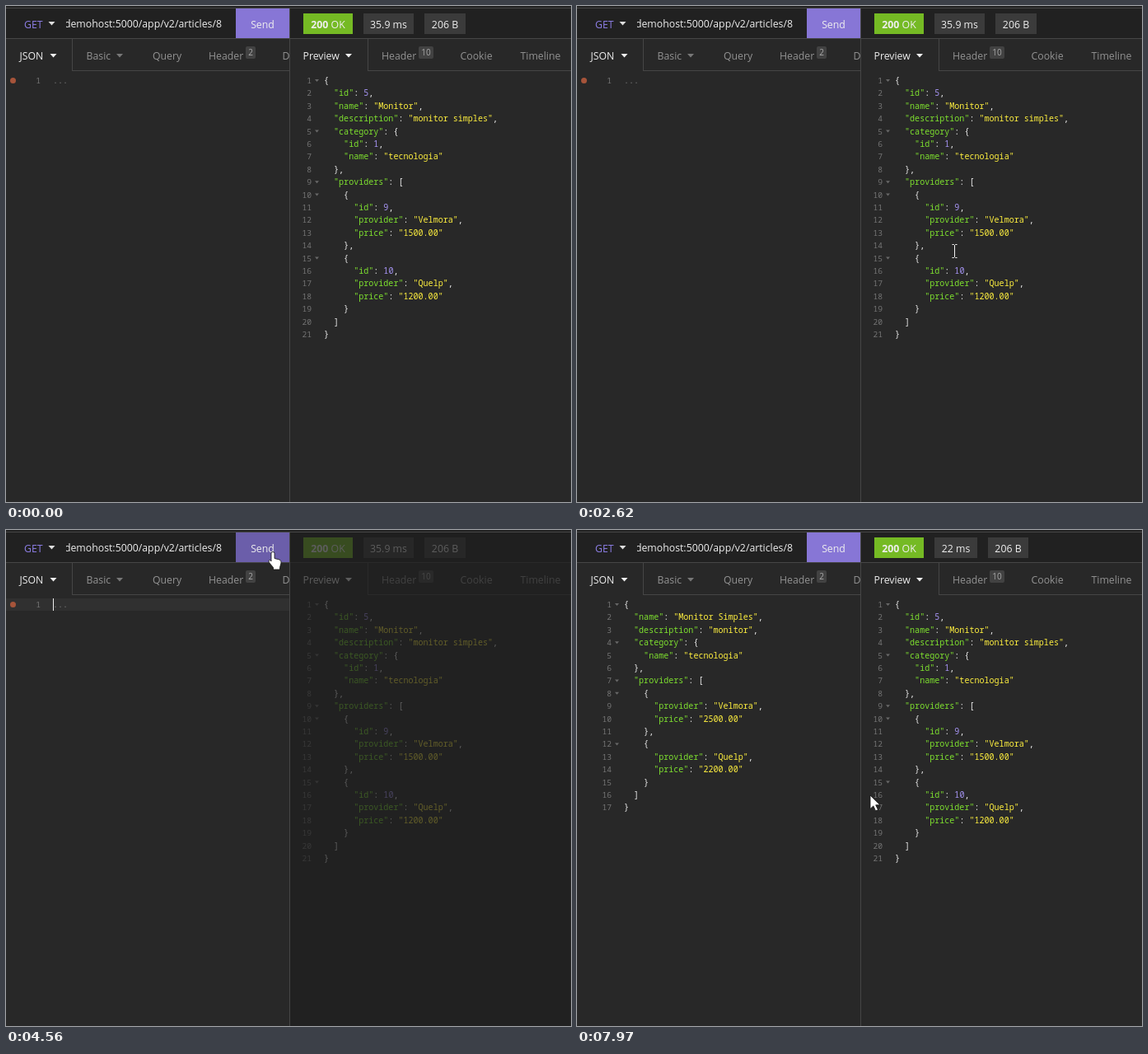
These frames come from a looping animation (686 px wide and 602 px high, 8 s). An HTML page:

```html
<!DOCTYPE html>
<html lang="en">
<head>
<meta charset="utf-8">
<title>API client</title>
<style>
html, body { margin: 0; width: 100%; height: 100%; overflow: hidden; background: #282828; }
svg { display: block; width: 686px; height: 602px; }
text { white-space: pre; fill: #eee; font: 12.3px "Open Sans", "Noto Sans", sans-serif; }
.code text { font: 500 10.05px "Noto Sans Mono", "DejaVu Sans Mono", monospace; }
.code text.num { fill: #747474; font-size: 9.7px; font-weight: 400; }
.key { fill: #7ee02f; }
.str { fill: #fff03f; }
.val { fill: #a795f5; }
.mid { text-anchor: middle; }
.end { text-anchor: end; }
text.dim { fill: #929292; }
text.small { font-size: 10px; fill: #aaa; }
</style>
</head>
<body>
<svg viewBox="0 0 686 602">
  <clipPath id="urlBox"><path d="M73 3h200v36H73z"/></clipPath>
  <clipPath id="leftPane"><path d="M0 0h344v602H0z"/></clipPath>
  <g id="ui"></g>
  <g id="idle" class="code">
    <rect id="active" y="83" width="344" height="15" fill="#303030"/>
    <circle cx="8.5" cy="90.5" r="3.5" fill="#a6543a"/>
    <text class="num end" x="42" y="94">1</text>
    <text x="57" y="94" style="fill:#777">...</text>
    <path id="caret" d="M57.5 83v15" stroke="#eee"/>
  </g>
  <g id="request" class="code"></g>
  <g id="response" class="code"></g>
  <g id="oldStats"></g>
  <g id="newStats"></g>
  <rect id="shade" x="345" y="3" width="341" height="599" fill="#1e1e1e"/>
  <g id="cursor">
    <path id="beam" d="M-3 -8h2l1 1 1 -1h2M0 -7v14M-3 8h2l1 -1 1 1h2" fill="none" stroke="#f4f4f4"/>
    <path id="arrow" d="M0 0v16.5l3.8 -3.6 2.8 6 2.9 -1.3 -2.8 -5.8h5.3z" fill="#fff" stroke="#111" stroke-width=".8"/>
    <path id="hand" d="M-2 1.5q0 -2 2 -2t2 2v6l6 1.5q2.6 1 2 4l-1.5 5.5v2.5h-8v-2.5l-5 -6q-1.5 -3 1 -3l1.5 1.5z" fill="#fff" stroke="#111" stroke-width=".8"/>
  </g>
</svg>
<script>
const LOOP = 8000, STEP = 69.4, ROW = 15.4, CHAR = 6.03, LINE = '#464646';
const $ = id => document.getElementById(id);
const show = (id, on) => $(id).setAttribute('visibility', on ? 'visible' : 'hidden');

const rect = (x, y, w, h, fill, extra = '') =>
  `<rect x="${x}" y="${y}" width="${w}" height="${h}" fill="${fill}" ${extra}/>`;
const label = (x, y, str, cls = '', extra = '') =>
  `<text x="${x}" y="${y}" class="${cls}" ${extra}>${str}</text>`;
const chevron = (x, y, fill, w = 8, h = 4.5) =>
  `<path d="M${x} ${y}h${w}l${-w / 2} ${h}z" fill="${fill}"/>`;
const badge = (x, w, str, fill = '#3b3b3b') =>
  rect(x, 9, w, 25, fill) + label(x + w / 2, 26.5, str, 'mid');
const tab = (x, str) => label(x, 65, str, 'dim');
const count = (x, w, str) =>
  rect(x, 49, w, 15, '#424242', 'rx="2"') + label(x + w / 2, 60, str, 'small mid');
const tabEdge = (x, end) => rect(x, 40, 1, 39, LINE) + rect(x, 78, end - x, 1, LINE);

$('ui').innerHTML =
  rect(0, 0, 686, 39, '#212121') + rect(0, 2, 686, 1, LINE) + rect(0, 39, 686, 1, LINE) +
  rect(279, 3, 65, 36, '#8776d6', 'id="send"') + rect(344, 3, 1, 599, LINE) +
  tabEdge(80, 344) + tabEdge(439, 686) +
  label(22, 26.5, 'GET', '', 'style="fill:#8d7ee6"') + chevron(51.5, 19, '#ddd') +
  `<g clip-path="url(#urlBox)">${label(262, 26, 'demohost:5000/app/v2/articles/8', 'end')}</g>` +
  label(311.5, 26.5, 'Send', 'mid') +
  label(16.5, 65, 'JSON') + chevron(53.5, 58, '#eee') +
  tab(97.5, 'Basic') + chevron(134, 58, '#777') +
  tab(178, 'Query') + tab(246, 'Header') + count(291, 12, 2) +
  `<g clip-path="url(#leftPane)">${tab(335.5, 'Docs')}</g>` +
  label(360.5, 65, 'Preview') + chevron(412, 58, '#eee') +
  tab(456, 'Header') + count(501, 18, 10) + tab(551.5, 'Cookie') + tab(624.5, 'Timeline') +
  badge(361, 60, '<tspan font-weight="700">200</tspan> OK', '#75ba24');
$('oldStats').innerHTML = badge(434, 61, '35.9 ms') + badge(508, 50, '206 B');
$('newStats').innerHTML = badge(434, 52, '22 ms') + badge(499, 49, '206 B');

// Pretty-printed JSON with line numbers and fold marks
function editor(id, data, x) {
  const paint = s => s.replace(/("[^"]*")(:?)|\d+/g, (all, word, colon) => {
    const cls = !word ? 'val' : colon ? 'key' : 'str';
    return `<tspan class="${cls}">${word || all}</tspan>${colon || ''}`;
  });
  $(id).innerHTML = JSON.stringify(data, null, 2).split('\n').map((line, i) => {
    const y = 94 + i * ROW, body = line.trimStart();
    return label(x - 15, y, i + 1, 'num end') +
      (/[{[]$/.test(body) ? chevron(x - 11, y - 5, '#686868', 5, 3) : '') +
      label(x + (line.length - body.length) * CHAR, y, paint(body));
  }).join('');
}
editor('response', {
  id: 5, name: 'Monitor', description: 'monitor simples',
  category: { id: 1, name: 'tecnologia' },
  providers: [
    { id: 9, provider: 'Velmora', price: '1500.00' },
    { id: 10, provider: 'Quelp', price: '1200.00' }
  ]
}, 386);
editor('request', {
  name: 'Monitor Simples', description: 'monitor',
  category: { name: 'tecnologia' },
  providers: [
    { provider: 'Velmora', price: '2500.00' },
    { provider: 'Quelp', price: '2200.00' }
  ]
}, 57);

// Pointer stops; radius and turns describe the circling on the way to a stop
const stop = (t, x, y, radius = 0, turns = 0) => ({ t, x, y, radius, turns });
const route = [
  stop(0, 470, 620), stop(250, 470, 600),
  stop(1092, 435, 311, 225, -1), stop(2619, 458, 297, 130, 3), stop(3383, 516, 204, 150, 1),
  stop(3525, 28, 30), stop(3740, 110, 145), stop(4240, 324, 27), stop(5700, 324, 27),
  stop(5930, 481, 168), stop(6215, 668, 587), stop(6290, 668, 587), stop(6640, 650, 620),
  stop(7600, 575, 620), stop(7960, 356, 322), stop(LOOP, 356, 322)
];
function pointer(t) {
  const s = t < 260 ? 0 : 260 + STEP * Math.floor((t - 260) / STEP);
  const i = route.findIndex(p => p.t > s), a = route[i - 1], b = route[i];
  const f = (s - a.t) / (b.t - a.t);
  const swing = b.radius * Math.sin(Math.PI * f), angle = 2 * Math.PI * b.turns * f;
  return [
    Math.round(a.x + (b.x - a.x) * f + swing * Math.cos(angle)),
    Math.round(a.y + (b.y - a.y) * f + swing * Math.sin(angle) * 0.75)
  ];
}

function draw(t) {
  const [x, y] = pointer(t);
  const onSend = x >= 279 && x < 345 && y < 40;
  const kind = onSend ? 'hand' : y < 80 || (x > 344 && x < 380) ? 'arrow' : 'beam';
  for (const k of ['beam', 'arrow', 'hand']) show(k, k == kind);
  const half = kind == 'beam' ? 0.5 : 0;
  $('cursor').setAttribute('transform', `translate(${x + half} ${y + half})`);
  $('send').setAttribute('fill', onSend ? '#6b5eaa' : '#8776d6');

  const pasted = t >= 7090, done = t >= 5250, focus = t >= 3740 && !pasted;
  const blinkOn = !done || (t >= 5520 && (t - 5520) % 1060 < 530);
  show('idle', !pasted);
  show('request', pasted);
  show('active', focus);
  show('caret', focus && blinkOn);
  show('oldStats', !done);
  show('newStats', done);

  const p = Math.min(1, Math.max(0, (t - 4370) / 400));
  $('shade').setAttribute('opacity', done ? 0 : 0.82 * (1 - (1 - p) ** 3));
}

const start = performance.now();
function tick() {
  draw((performance.now() - start) % LOOP);
  requestAnimationFrame(tick);
}
tick();
</script>
</body>
</html>
```
